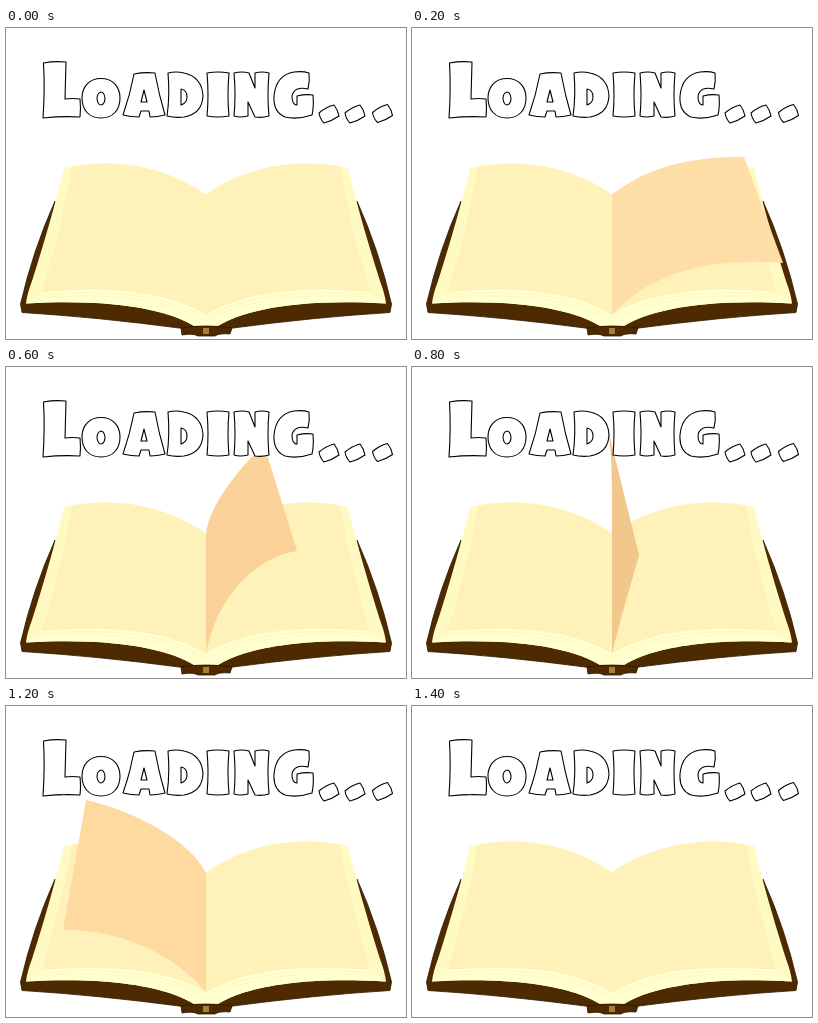
Write an HTML page that moves like this. It is 400 px wide and 311 px high and loops after 1.6 s.

```html
<!DOCTYPE html>
<html lang="en">
<head>
<meta charset="utf-8">
<title>Loading...</title>
<style>
html, body { margin: 0; width: 100%; height: 100%; overflow: hidden; background: #fff; }
svg { display: block; width: 400px; height: 311px; }
</style>
</head>
<body>
<svg viewBox="0 0 400 311" role="img" aria-label="Loading...">
  <defs>
    <path id="cover" fill="#4d2a00" stroke="#2b1700" stroke-width=".8" d="M49 173Q27 222 14.500 276L16 284.500Q90 289 177 300.500H200V270H60Z"/>
    <g id="pages">
      <path fill="#fff9c2" d="M58 140C103 130 157 136 200.500 167V298H188C165 283 110 270 20 275.500Q21 266 26 253Q46 190 58 140Z"/>
      <path fill="#ffffcf" d="M35 264C100 258 160 262 200.500 287V298H188C165 283 110 270 20 275.500Z"/>
      <path fill="none" stroke="#fff7c2" d="M31 267C100 261 160 266 200 290M27 270C100 264 160 270 200 293"/>
      <path fill="#fff1ba" d="M66 138.500C108 131 158 137 200.500 167V287C160 262 100 258 36 264Q56 198 66 138.500Z"/>
    </g>
    <path id="dot" d="M313 85Q320 79 328 77Q332 82 333 88Q326 93 318 95Q314 91 313 85Z"/>
  </defs>
  <use href="#cover"/>
  <use href="#cover" transform="matrix(-1 0 0 1 400 0)"/>
  <use href="#pages"/>
  <use href="#pages" transform="matrix(-1 0 0 1 400 0)"/>
  <path fill="#4d2a00" stroke="#2b1700" stroke-width=".8" d="M175 300Q187 298 200 298Q214 298 226 300L224 306Q213 305 209 308H192Q187 305 176 307Z"/>
  <rect x="197" y="300" width="6" height="6" fill="#a98032"/>
  <path id="leaf"/>
  <g fill="#fff" fill-rule="evenodd" stroke="#000" stroke-width="1.100" stroke-linejoin="round">
    <path d="M37.500 35Q48 33 60 34L59 71Q66 70 74 71Q75 80 74 89Q56 88 37 90Q39 62 37.500 35Z"/>
    <path d="M95 50.500C107 50.500 114 59 114 70C114 82 107 90 95 90C83 90 76 82 76 70C76 59 83 50.500 95 50.500ZM95 64Q91 65 91 71Q92 77 95 77Q99 76 99 70Q98 64 95 64Z"/>
    <path d="M128 46Q138 44 149 45Q153 67 159 87Q151 89 144 89L143 83H135L133 89Q125 89 117 87Q124 67 128 46ZM138 62L135 74H141Z"/>
    <path d="M162 45Q170 43 178 45Q196 49 197 68Q196 86 178 89Q169 90 161 88Q164 68 162 45ZM175 61V77Q181 75 181 69Q181 62 175 61Z"/>
    <path d="M201 45Q212 43 223 45Q221 67 223 88Q212 90 201 88Q203 67 201 45Z"/>
    <path d="M228 45Q236 43 243 45L249 60V45Q256 43 263 45Q261 67 263 88Q256 90 249 89L242 74V88Q234 90 228 88Q230 67 228 45Z"/>
    <path d="M303 45Q304 53 302 61Q288 58 286 68Q286 77 291 77V68Q299 66 307 67Q308 79 306 87Q291 92 279 89Q267 84 268 68Q270 47 288 44Q297 43 303 45Z"/>
    <use href="#dot"/>
    <use href="#dot" x="26"/>
    <use href="#dot" x="53.500" y="-.5"/>
  </g>
</svg>
<script>
const STEP = 200, LOOP = 1600;
const leaf = document.getElementById("leaf");

// top: curve from spine to upper corner; low: lower corner; back: curve to the spine
const poses = [
  null,
  { fill: "#ffdda7", top: "233 139 282 128 332 129", low: "371 235", back: "300 229 238 244 200 287" },
  { fill: "#ffd99f", top: "216 136 261 117 307 97", low: "344 196", back: "282 196 216 222 200 287" },
  { fill: "#fad199", top: "203 140 230 104 258 78", low: "291 184", back: "250 190 210 230 200 287" },
  { fill: "#f2c78b", top: "200 135 201 92 196 62", low: "227 188", back: "219 218 208 252 200 287" },
  { fill: "#f9d093", top: "199 130 166 95 131 68", low: "118 210", back: "150 228 184 252 200 285" },
  { fill: "#ffdaa0", top: "185 136 132 106 80 94", low: "57 224", back: "110 222 168 247 200 286" },
  null
];

function draw(time) {
  const pose = poses[Math.floor((time % LOOP) / STEP)];
  leaf.setAttribute("visibility", pose ? "visible" : "hidden");
  if (!pose) return;
  leaf.setAttribute("fill", pose.fill);
  leaf.setAttribute("d", `M200 167C${pose.top}L${pose.low}C${pose.back}Z`);
}

const start = performance.now();
function tick() {
  draw(performance.now() - start);
  requestAnimationFrame(tick);
}
tick();
</script>
</body>
</html>
```
